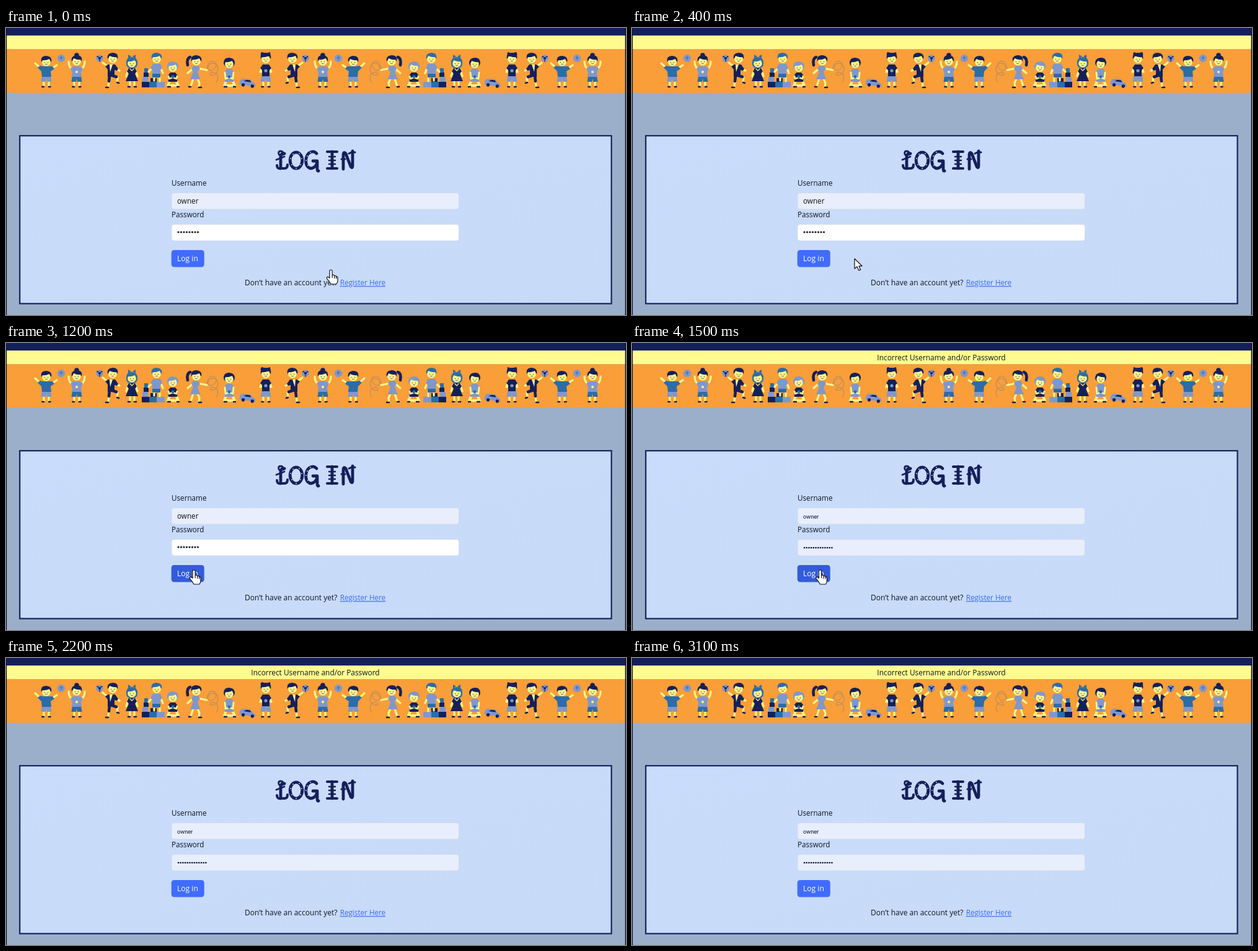
Recreate the animation shown at these times as an HTML page. Size 1000x464 px, loop 3200 ms.

```html
<!DOCTYPE html>
<html lang="en">
<head>
<meta charset="utf-8">
<title>Log in</title>
<style>
html, body { margin: 0; width: 100%; height: 100%; overflow: hidden; background: #9cafca; }
svg { display: block; width: 100vw; height: 100vh; }
text { font-family: "Open Sans", sans-serif; font-size: 11.7px; fill: #0d1526; }
.old { font-weight: 500; fill: #111; }
.small { font-family: Roboto, "Liberation Sans", sans-serif; font-size: 9.2px; }
.line { fill: none; stroke-linecap: round; stroke-linejoin: round; }
</style>
</head>
<body>
<svg viewBox="0 0 1000 464">
  <defs>
    <linearGradient id="paper" x1="0" y1="0" x2="1" y2="1">
      <stop offset="0" stop-color="#c9dcfb"/><stop offset="1" stop-color="#c7daf8"/>
    </linearGradient>
  </defs>
  <rect width="1000" height="464" fill="#9cafca"/>
  <rect width="1000" height="12.3" fill="#14205b"/>
  <rect y="12.3" width="1000" height="22" fill="#fffb8f"/>
  <rect y="34.3" width="1000" height="70.5" fill="#f99e38"/>
  <g id="kids"></g>
  <path d="M.5 0V464M999.3 0V464" stroke="#10152e" stroke-width="1.4"/>
  <rect x="22.2" y="174.2" width="954.3" height="271.4" fill="url(#paper)" stroke="#14235f" stroke-width="2.2"/>

  <g class="line" role="img" aria-label="LOG IN" stroke="#14205b" stroke-width="4.8">
    <path d="M443 227V208Q444 201 449 203"/>
    <path d="M443 207C438 204 439 199 443 199C447 199 448 202 447 205M436 213L449 208" stroke-width="2.8"/>
    <path d="M437 222Q437 228 443 227H449Q454 227 454 221" stroke-width="4"/>
    <ellipse cx="468" cy="214" rx="9.8" ry="13.2"/>
    <path d="M501 203C496 197 486 200 484 211C482 224 490 230 497 225C502 221 502 217 502 215H495M502 216V227Q502 232 504 231"/>
    <path d="M518 200H534M518 227H534" stroke-width="4"/>
    <path d="M526 200V227"/>
    <path d="M521 208H531M521 214H531M521 220H531" stroke-width="2.4"/>
    <path d="M544 228V206Q544 199 548 203L556 224Q559 228 559 222V199"/>
    <path d="M553 203Q558 200 563 201M541 212H547" stroke-width="3"/>
    <path d="M459 211V211M461 221V221M468 227V227M475 221V221M477 211V211M473 203V203M463 204V204M486 207V207M484 214V214M487 222V222M491 201V201" stroke="#c9dcfb" stroke-width="1.8"/>
  </g>

  <text x="267" y="255.3">Username</text>
  <text x="267" y="306">Password</text>
  <g stroke="#d0d9e8" stroke-width=".8">
    <rect x="267" y="266.5" width="463.5" height="26.5" rx="4" fill="#e8eefb"/>
    <rect id="pass" x="267" y="317.5" width="463.5" height="26.5" rx="4"/>
  </g>
  <text id="user" x="276" y="283.7">owner</text>
  <g id="dots" fill="#111827"></g>
  <rect id="button" x="266.7" y="359" width="53" height="27.5" rx="4.5"/>
  <text x="276" y="376.6" style="fill:#fff;font-size:12.1px">Log in</text>
  <text x="385" y="416.2" style="font-size:12px">Don’t have an account yet?</text>
  <text x="538.7" y="416.2" style="fill:#3b6df0;text-decoration:underline">Register Here</text>
  <text id="message" x="499" y="27.6" text-anchor="middle" style="font-size:11.9px">Incorrect Username and/or Password</text>
  <g id="cursor" stroke-linejoin="round">
    <path id="hand" fill="#fff" stroke="#10131c" stroke-width="1.2" d="M-2 2Q-2 0 0 0Q2.2 0 2.2 2V8.5Q5 7.5 5.6 9.8Q8 8.8 8.6 11Q11 10.4 11 13V17Q11 20 9 23H0Q-2 19 -6.5 14.2Q-7 11 -4.5 11.5L-2 13.2ZM2.2 8.5V13M5.6 10V14M8.6 11V14.5"/>
    <path id="arrow" fill="#fff" stroke="#10131c" stroke-width="1.2" d="M0 0V16L4 12.8L6.8 19L9.6 17.8L7 11.8H12Z"/>
  </g>
</svg>
<script>
const $ = id => document.getElementById(id);
const NAVY = '#14205b', BLUE = '#2b6ca9', SKY = '#7f97cd', SKIN = '#fdf58b';

const line = (d, color = SKIN, w = 3.2) => `<path class="line" d="${d}" stroke="${color}" stroke-width="${w}"/>`;
const fill = (d, color) => `<path d="${d}" fill="${color}"/>`;
const dot = (x, y, r, color) => `<circle cx="${x}" cy="${y}" r="${r}" fill="${color}"/>`;
const box = (x, y, w, h, color) => `<rect x="${x}" y="${y}" width="${w}" height="${h}" fill="${color}"/>`;

// Face under a swept fringe; long adds hair behind the cheeks.
function head(x, y, hair, long = 0) {
  const back = long ? `<rect x="${x - 9}" y="${y - 8}" width="18" height="${11 + long}" rx="7" fill="${hair}"/>` : '';
  return back + dot(x, y + 1, 6.8, SKIN) +
    fill(`M${x - 8} ${y + 1}Q${x - 10} ${y - 9} ${x} ${y - 9}Q${x + 10} ${y - 8} ${x + 8} ${y + 1}Q${x + 6} ${y - 1} ${x + 5} ${y - 4}Q${x - 2} ${y - 1} ${x - 6} ${y - 2}Z`, hair) +
    dot(x - 2.6, y + 1.6, .7, NAVY) + dot(x + 2.6, y + 1.6, .7, NAVY) +
    line(`M${x - 1.6} ${y + 4.4}q1.6 1.2 3.2 0`, NAVY, .7);
}
const ball = (x, y) => dot(x, y, 5.8, SKY) + dot(x, y, 2.1, NAVY) +
  line(`M${x - 4} ${y - 3}l2 1M${x + 4} ${y - 3}l-2 1M${x} ${y + 5}v-2`, NAVY, 1.4);

function spiky(x, y) {
  let d = '';
  for (let i = 0; i < 20; i++) {
    const a = i * Math.PI / 10, r = i % 2 ? 5.3 : 7;
    d += (i ? 'L' : 'M') + (x + r * Math.cos(a)) + ' ' + (y + r * Math.sin(a));
  }
  return fill(d + 'Z', SKY) + line(`M${x - 2} ${y - 1}h4M${x} ${y - 3}v5`, BLUE, 1);
}
const standLegs = () => line('M-4 84V94M4 84V94') + line('M-4 95h-2.5M4 95h2.5', NAVY, 2.6);
const shorts = color => fill('M-7 77H7L8.5 87H1L0 82L-1 87H-8.5Z', color);

const figures = {
  wave: () => line('M-8 66L-18 57M8 66L17 60') + standLegs() + shorts(SKY) +
    fill('M-5 62L-10 61L-14 64L-8 70L-7 79H8L7 70L13 66L10 62Z', BLUE) +
    head(0, 54, NAVY) + spiky(24, 49),
  bun: () => line('M-6 67Q-13 64 -13 54M6 67Q13 64 13 54') + standLegs() + shorts(BLUE) +
    fill('M-5 62H5L10 65L7 72L8 79H-8L-7 72L-10 65Z', SKY) + dot(0, 71, 2, SKIN) +
    dot(0, 44, 3.8, NAVY) + head(0, 53, NAVY),
  kick: () => line('M-5 64L-14 69M4 63L13 56') + line('M-3 77L-11 80L-10 87') + line('M2 78L4 94') +
    line('M-3 77L-9 79M2 77L3 86', NAVY, 4.6) + line('M-10 88l-3 1M4 96h4', NAVY, 2.6) +
    fill('M-7 59H4L9 62L5 67V79H-6V68L-10 69L-12 66Z', NAVY) + fill('M-3 59H2L1 71Z', SKIN) +
    head(-3, 49, NAVY) + ball(18, 49),
  bow: () => line('M-6 68L-9 78M6 68L9 78') + line('M-3 84V93M4 84V93') + line('M-3 95h-3M4 95h3', NAVY, 2.6) +
    head(0, 56, BLUE, 6) +
    fill('M-5 65H5L8 70L5 74L10 86H-10L-5 74L-8 70Z', NAVY) + line('M-3 66L0 69L3 66', SKIN, 1.2) +
    fill('M-1 46L-6 43V49ZM1 46L6 43V49Z', BLUE),
  blocks: () => box(-24, 87, 12, 9, NAVY) + box(-12, 87, 12, 9, BLUE) + box(0, 87, 13, 9, SKY) +
    box(-23, 79, 9, 8, SKY) + box(-21, 72, 8, 7, NAVY) + box(-20, 65, 6, 7, BLUE) + box(-10, 81, 10, 6, NAVY) +
    line('M-6 63L-13 71M6 63L10 73') + line('M-4 78V85M5 78V86') +
    fill('M-6 58H6L9 65L6 68V76H-7V68L-10 65Z', SKY) + box(-7, 74, 13, 6, BLUE) + head(0, 49, BLUE),
  grey: () => sit(SKY, NAVY, 63),
  sit: () => sit(NAVY, SKY, 57),
  hoop: () => line('M-3 66L-11 73M5 65L20 68') + line('M-2 82L-6 94M5 82L8 89L7 95') +
    line('M-6 95h-3M7 96h4', NAVY, 2.6) + fill('M-2 61H6L9 66L5 71L9 83H-7L-2 71L-5 66Z', SKY) +
    line('M-7 47Q-13 49 -11 60', NAVY, 4.6) + head(3, 53, NAVY) +
    line('M20 66Q23 49 33 55Q39 62 28 69Q17 68 25 58Q37 54 38 66Q37 78 25 76Q25 68 36 74Q40 82 35 88', '#aa8a70', 1),
  stand: () => line('M-6 63L-9 71L-2 70M6 63L9 71L2 70') + standLegs() + shorts(SKY) +
    fill('M-5 59H5L9 65L6 68V78H-6V68L-9 65Z', NAVY) + dot(0, 69, 2.6, SKY) +
    head(0, 49, NAVY) + fill('M-8 45Q-9 39 -6 39L0 41L7 39L8 46Z', NAVY),
  car: () => `<g transform="rotate(8 0 89)">` + fill('M-13 87Q-10 82 -3 83H4L7 87Q13 87 13 93H-13Z', SKY) +
    fill('M-7 87L-3 84H3L5 87Z', NAVY) + dot(-7, 93, 2.7, NAVY) + dot(8, 93, 2.7, NAVY) + '</g>'
};

function sit(hair, dress, y) {
  return head(0, y, hair, 3) +
    line('M-5 86L-8 93H2M6 87L9 93H5', SKIN, 4) + line('M-8 95H-4M7 95H10', NAVY, 2.4) +
    fill(`M-4 ${y + 9}H4L8 ${y + 14}L7 87H-7L-8 ${y + 14}Z`, dress) +
    line(`M-7 ${y + 15}L-6 82L0 80M7 ${y + 15}L6 82L0 80`, SKIN, 2.8) + dot(0, 79, 2.4, BLUE);
}

// A leading minus mirrors the figure.
const row = 'wave 65,-bun 114,-kick 169,bow 203,blocks 243,grey 269,hoop 304,sit 360,car 390,stand 419,' +
  'kick 465,bun 511,-wave 560,-hoop 625,-grey 658,-blocks 686,-bow 727,-sit 756,car 785,-stand 816,kick 851,wave 897,-bun 946';
$('kids').innerHTML = row.split(',').map(item => {
  const [name, x] = item.split(' '), flip = name[0] === '-';
  return `<g transform="translate(${x} 0) scale(${flip ? -1 : 1} 1)">${figures[flip ? name.slice(1) : name]()}</g>`;
}).join('');

const LOOP = 3200, STEP = 100, REPLY = 1400, LEAVE = 2200;
const path = [[0, 524, 391], [400, 359, 373], [600, 301, 370], [700, 300, 369],
  [1200, 303, 367], [1900, 304, 367], [LEAVE, 500, 480]];

function pointer(t) {
  const i = path.findIndex(p => p[0] > t);
  if (i < 0) return path[path.length - 1].slice(1);
  const [a, b] = [path[i - 1], path[i]], k = (t - a[0]) / (b[0] - a[0]);
  return [a[1] + (b[1] - a[1]) * k, a[2] + (b[2] - a[2]) * k];
}
const show = (id, on) => $(id).setAttribute('visibility', on ? 'visible' : 'hidden');

function bullets(n, gap, r, y) {
  let s = '';
  for (let i = 0; i < n; i++) s += dot(278 + i * gap, y, r, '#111827');
  return s;
}
const typed = bullets(8, 4.5, 1.6, 330), filled = bullets(13, 3.7, 1.35, 331);

let last = -1;
function draw(t) {
  if (t === last) return;
  last = t;
  const [x, y] = pointer(t), failed = t >= REPLY;
  const over = x > 267 && x < 320 && y > 359 && y < 387;
  const hand = over || t < STEP;
  $('cursor').setAttribute('transform', `translate(${x} ${y})`);
  show('cursor', t < LEAVE);
  $('hand').style.display = hand ? '' : 'none';
  $('arrow').style.display = hand ? 'none' : '';
  $('button').setAttribute('fill', over ? '#345bd9' : '#406cfc');
  show('message', failed);
  $('user').setAttribute('class', failed ? 'small' : 'old');
  $('pass').setAttribute('fill', failed ? '#e8eefb' : '#fff');
  $('dots').innerHTML = failed ? filled : typed;
}

const start = performance.now();
function tick() {
  const t = (performance.now() - start) % LOOP;
  draw(Math.floor(t / STEP) * STEP);
  requestAnimationFrame(tick);
}
tick();
</script>
</body>
</html>
```
